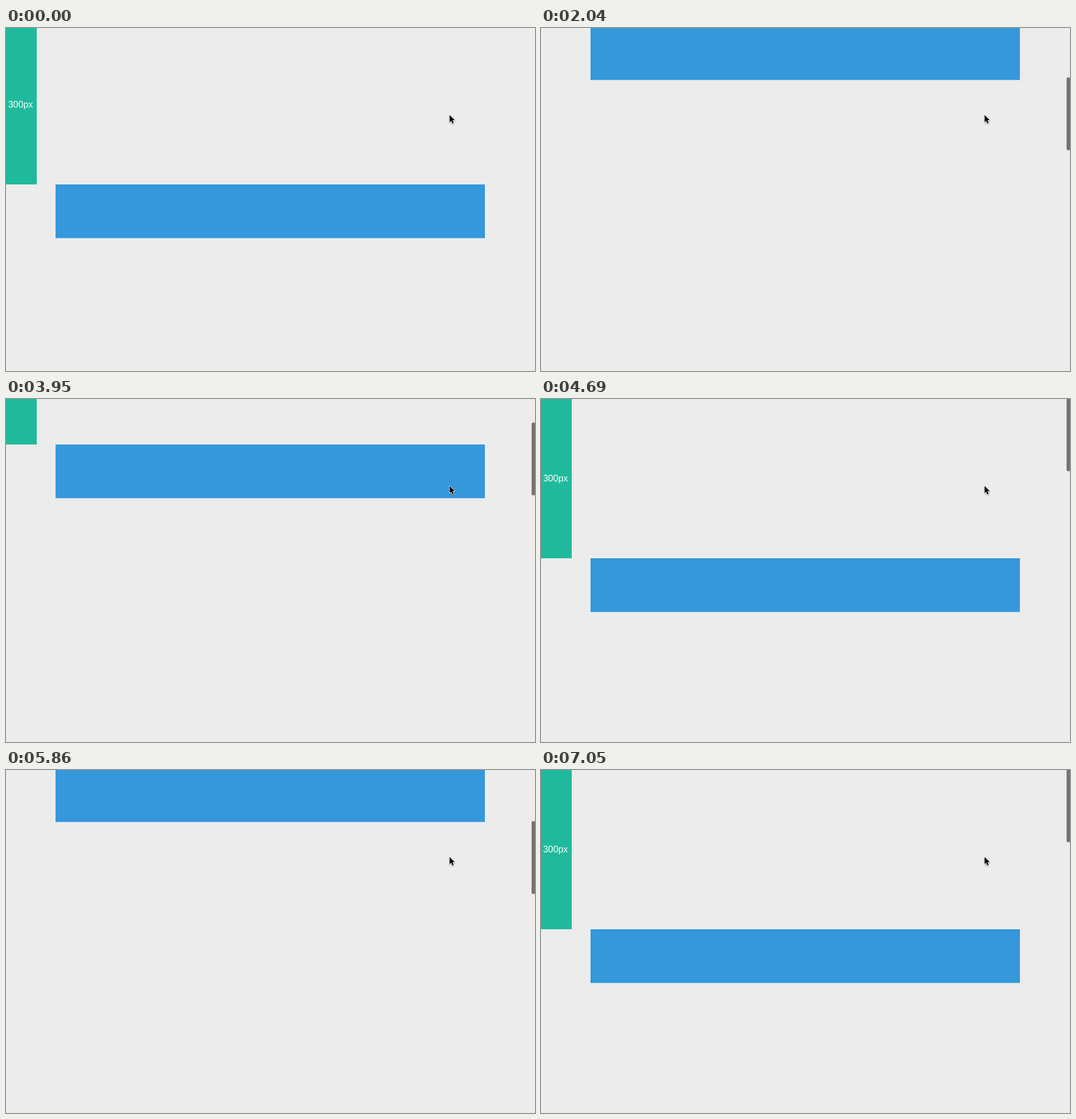
Write an HTML page that moves like this. It is 929 by 603 pixels and loops after 7190 ms.

```html
<!DOCTYPE html>
<html lang="en">
<head>
<meta charset="utf-8">
<title>Sticky bar on scroll</title>
<style>
  html, body { margin: 0; width: 100%; height: 100%; overflow: hidden; background: #ececec; }
  svg { display: block; }
  text { font: 16px "Liberation Sans", Arial, sans-serif; fill: #fff; }
  #cursor { filter: drop-shadow(0 1px 1px rgba(0, 0, 0, .4)); }
</style>
</head>
<body>
<svg width="929" height="603" viewBox="0 0 929 603">
  <g id="side">
    <rect width="54" height="283" fill="#1fba9b"/>
    <text x="3.7" y="147.5">300px</text>
  </g>
  <rect id="bar" x="87" width="754" height="94.4" fill="#3498db"/>
  <rect id="thumb" x="923" width="6.5" rx="3" fill="#747474"/>
  <path id="cursor" d="M779 153v12.6l2.8-2.7 2.1 4.8 2.2-.9-2-4.7h4z" fill="#000"
    stroke="#fff" stroke-width="1.6" paint-order="stroke" stroke-linejoin="round"/>
</svg>
<script>
const LOOP = 7190, START = 1190, SPLIT = 2178;
const CROP = -3;          // top of the page lies just above the stage
const [side, bar, thumb] = ["side", "bar", "thumb"].map(id => document.getElementById(id));

// [step, scroll offset]; negative offsets are the rubber-band overscroll
const keys = [
  [-1, 5], [0, 12], [6, 414], [7, 424], [12, 1047], [15, 820], [19, 200],
  [22, -6], [23, -5], [24, 0], [26, 706], [28, 950], [32, 200], [33, -6],
  [34, -4], [37, 0], [41, 0]
];

// The screen refreshes in steps, slightly faster at first
function stepAt(t) {
  if (t < START) return -1;
  if (t < SPLIT) return Math.min(6, Math.floor((t - START) / 141.4));
  return 7 + Math.floor((t - SPLIT) / 147.6);
}

const slope = k => (keys[k + 1][1] - keys[k][1]) / (keys[k + 1][0] - keys[k][0]);

// Tangent that never overshoots a key
function tangent(k) {
  if (k === 0 || k === keys.length - 1) return 0;
  const a = slope(k - 1), b = slope(k);
  return a * b > 0 ? 2 * a * b / (a + b) : 0;
}

function scrollAt(step) {
  let k = 0;
  while (k < keys.length - 2 && step >= keys[k + 1][0]) k++;
  const [x0, y0] = keys[k], [x1, y1] = keys[k + 1];
  const w = x1 - x0, u = Math.min(1, (step - x0) / w), v = 1 - u;
  return y0 * (1 + 2 * u) * v * v + y1 * u * u * (3 - 2 * u)
    + w * (tangent(k) * u * v * v - tangent(k + 1) * u * u * v);
}

function draw(now) {
  const step = stepAt(now % LOOP), scroll = Math.round(scrollAt(step));
  side.setAttribute("transform", `translate(0 ${CROP - scroll})`);
  bar.setAttribute("y", Math.max(CROP, 280 - scroll));
  thumb.setAttribute("y", -1.3 + 0.2128 * Math.max(0, scroll));
  thumb.setAttribute("height", 128.3 + Math.min(0, scroll) / 4);
  thumb.style.display = step < 0 ? "none" : "";
  requestAnimationFrame(draw);
}
draw(0);
</script>
</body>
</html>
```
